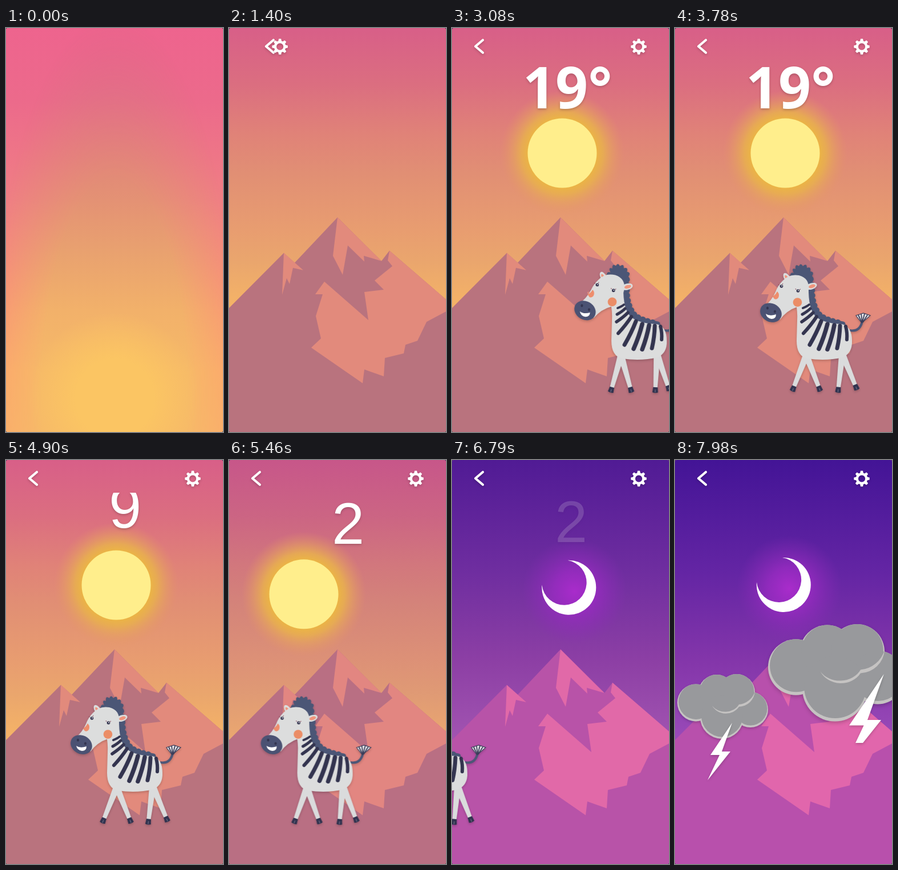
Recreate the animation shown at these times as an HTML page. Size 380 by 704 pixels, loop 8000 ms.

```html
<!DOCTYPE html>
<html lang="en">
<head>
<meta charset="utf-8">
<title>Weather</title>
<style>
  html, body { margin: 0; width: 100%; height: 100%; overflow: hidden; background: #35325f; }
  #stage { position: relative; width: 380px; height: 704px; border-radius: 3px; overflow: hidden; }
  #stage > * { position: absolute; inset: 0; width: 380px; height: 704px; }
  #splash { background: linear-gradient(#ee648e 0, #ec6a8b 18%, #f07f84 43%, #f99179 64%, #fda56e 85%, #fcab6d); }
  #splash i { position: absolute; inset: 0; }
  #core {
    background: linear-gradient(#d86a84 5%, #da7482 16%, #df827a 28%, #e49274 43%, #e9a26f 56%, #f2b16a 70%, #f6b968 85%);
    -webkit-mask-image: radial-gradient(ellipse 230px 690px at 190px 640px, #000 55%, transparent 96%);
    mask-image: radial-gradient(ellipse 230px 690px at 190px 640px, #000 55%, transparent 96%);
  }
  #warm { background: radial-gradient(ellipse 150px 150px at 190px 645px, #fbc563 45%, rgba(251,197,99,0)); }
  .lift { filter: drop-shadow(0 2px 2px rgba(0,0,0,.2)); }
  .bold { font: 700 100px "Open Sans", "Noto Sans", sans-serif; }
  .thin { font: 400 102px "Liberation Sans", Arial, sans-serif; text-anchor: middle; }
</style>
</head>
<body>
<div id="stage">
<svg viewBox="0 0 380 704">
  <defs>
    <linearGradient id="day" x2="0" y2="1">
      <stop offset="0" stop-color="#d85f88"/><stop offset=".14" stop-color="#db6e80"/>
      <stop offset=".26" stop-color="#e08278"/><stop offset=".36" stop-color="#e18f74"/>
      <stop offset=".5" stop-color="#e89d70"/><stop offset=".58" stop-color="#eaa66d"/>
      <stop offset=".7" stop-color="#f6b566"/>
    </linearGradient>
    <linearGradient id="night" x2="0" y2="1">
      <stop offset="0" stop-color="#431496"/><stop offset=".28" stop-color="#6425a4"/>
      <stop offset=".5" stop-color="#8436aa"/><stop offset=".7" stop-color="#9a4bb9"/>
    </linearGradient>
    <radialGradient id="sunGlow">
      <stop offset=".55" stop-color="#ebb445"/><stop offset=".66" stop-color="#e8ae50" stop-opacity=".9"/>
      <stop offset=".8" stop-color="#e6a35d" stop-opacity=".55"/><stop offset="1" stop-color="#e49468" stop-opacity="0"/>
    </radialGradient>
    <radialGradient id="moonGlow">
      <stop offset="0" stop-color="#a92ccb"/><stop offset=".4" stop-color="#9a2bc2" stop-opacity=".8"/>
      <stop offset="1" stop-color="#8a2bb5" stop-opacity="0"/>
    </radialGradient>
    <clipPath id="slot"><path d="M120 57h170v95H120z"/></clipPath>
    <g id="cloud"></g>
    <path id="bolt" d="M43 0L5 56H21L0 100 40 50H25z" fill="#fff"/>
    <g id="leg">
      <path d="M-6-4H6L3.5 60H-3.5z" fill="#dadbdc"/>
      <path d="M-4 58H4L5 67Q0 69-5 67z" fill="#32334f"/>
      <path d="M0 62v5" stroke="#777b92"/>
    </g>
  </defs>

  <rect width="380" height="704" fill="url(#day)"/>
  <rect id="dark" width="380" height="704" fill="url(#night)"/>

  <g id="sun">
    <circle r="109" fill="url(#sunGlow)"/>
    <circle r="60.5" fill="#ffee8c"/>
  </g>
  <g id="moon">
    <circle cx="200" cy="224" r="92" fill="url(#moonGlow)"/>
    <path d="M143 213A47.5 47.5 0 1 0 188 170A39.2 39.2 0 1 1 143 213z" fill="#fff"/>
  </g>
</svg>
<div id="splash"><i id="core"></i><i id="warm"></i></div>
<svg viewBox="0 0 380 704">
  <g id="hills">
    <path id="rock" d="M0 488L96 392 115 409 190 330 267 406 281 388 380 473V704H0z"/>
    <path id="snow" d="M96 392L130 422 112 418 106 446 101 436 93 465z
      M190 330L267 406 236 397 237 407 208 379 199 430 182 397z
      M281 388L380 473V494L346 512 330 545 309 552 306 567 273 575 271 607 237 595 234 619 144 557 161 541 152 502 164 464H151L167 442 244 509 237 460 271 456 255 440 286 415 278 405z"/>
  </g>

  <g fill="#fff" class="lift">
    <g id="temp" class="bold"><text x="124" y="140">1</text><text x="181" y="140">9</text><text x="238" y="140">°</text></g>
    <g id="roll" class="thin" clip-path="url(#slot)"><text id="nine" x="208.5">9</text><text id="two" x="208.5">2</text></g>
  </g>

  <g id="zebra" class="lift">
    <path d="M306 527Q324 530 328 511" fill="none" stroke="#4d5677" stroke-width="4"/>
    <path d="M327 514L317 501 330 497 342 501z" fill="#e9e9ea" stroke="#3a3d5a" stroke-width="1.2"/>
    <path d="M327 513L321 500M328 513L326 498M328 513L332 498M329 513L337 500" stroke="#3a3d5a" stroke-width="1.8"/>
    <g id="legs"></g>
    <g fill="none" stroke="#4b5676" stroke-linecap="round">
      <path id="mane" d="M237 448Q233 484 252 503Q268 512 294 516" stroke-width="9"/>
      <path d="M240 448Q238 484 255 502Q270 511 294 515" stroke-width="11" stroke-dasharray="0 9"/>
    </g>
    <path d="M200 450Q216 478 214 510L213 545Q213 572 232 576Q264 581 294 574Q311 566 310 545Q310 520 292 516Q262 515 248 504Q233 492 234 450z" fill="#dcdddd"/>
    <g id="stripes" fill="none" stroke="#33344f" stroke-linecap="round"></g>
    <g id="head">
      <path d="M201 434Q202 424 208 427Q203 417 211 420Q210 410 217 415Q220 408 224 415Q231 409 231 418Q239 415 237 424Q245 425 240 432Q246 438 240 443Q244 452 236 456z" fill="#4b5676"/>
      <ellipse cx="196" cy="435" rx="5" ry="9" transform="rotate(-32 196 435)" fill="#dcdddd"/>
      <ellipse cx="196" cy="436" rx="2.4" ry="6" transform="rotate(-32 196 436)" fill="#f0957c"/>
      <path d="M188 441Q199 428 217 431Q236 436 234 456Q232 474 214 486Q196 492 184 508L156 486Q170 474 176 460Q180 449 188 441z" fill="#dcdddd"/>
      <ellipse cx="239" cy="450" rx="10" ry="5.5" transform="rotate(-18 239 450)" fill="#dcdddd"/>
      <ellipse cx="240" cy="450" rx="6" ry="3" transform="rotate(-18 240 450)" fill="#f0957c"/>
      <path d="M179 459Q184 464 181 470Q178 474 174 472L171 468Q176 465 179 459z" fill="#ee8d6c"/>
      <circle cx="214.5" cy="478" r="7.8" fill="#eb8d66"/>
      <g fill="#33344f">
        <circle cx="186.500" cy="450" r="2.8"/><circle cx="215.500" cy="458" r="2.8"/>
      </g>
      <path d="M183 448l-2-1M188 447l1-2M212 456l-1-2M218 456l2-1" stroke="#8b4a5d"/>
      <g fill="#fff"><circle cx="187" cy="449.500" r=".9"/><circle cx="216" cy="457.500" r=".9"/></g>
      <ellipse cx="168" cy="496" rx="19.500" ry="16" transform="rotate(26 168 496)" fill="#4b5273"/>
      <ellipse cx="162" cy="488" rx="2" ry="2.500" fill="#33344f"/><ellipse cx="175" cy="494" rx="2" ry="2.500" fill="#33344f"/>
      <path d="M159 498Q166 503 177 499Q177 507 169 507Q161 506 159 498z" fill="#fff"/>
    </g>
  </g>

  <g id="clouds">
    <use id="cloudR" href="#cloud" class="lift"/>
    <use id="cloudL" href="#cloud" class="lift"/>
  </g>
  <g class="lift"><use id="boltR" href="#bolt"/><use id="boltL" href="#bolt"/></g>

  <path id="back" d="M54 21L41 32L54 43" class="lift" fill="none" stroke="#fff" stroke-width="4.200" stroke-linecap="round" stroke-linejoin="round"/>
  <g id="gear" class="lift"></g>
</svg>
</div>
<script>
const $ = id => document.getElementById(id);
const clamp = x => Math.min(1, Math.max(0, x));
const part = (t, a, b) => clamp((t - a) / (b - a));
const out = u => 1 - (1 - u) ** 3;
const smooth = u => u * u * (3 - 2 * u);
const move = (id, x, y, more = '') => $(id).setAttribute('transform', `translate(${x} ${y})${more}`);
const show = (id, o) => { $(id).style.opacity = o; };

// linear path through [time, value] pairs
function track(t, keys) {
  if (t <= keys[0][0]) return keys[0][1];
  for (let i = 1; i < keys.length; i++) {
    const [a, v] = keys[i - 1], [b, w] = keys[i];
    if (t <= b) return v + (w - v) * (t - a) / (b - a);
  }
  return keys[keys.length - 1][1];
}

function mix(a, b, p) {
  return `rgb(${a.map((v, i) => Math.round(v + (b[i] - v) * p))})`;
}

// static pieces
const puffs = [[32.5, 50, 32.5], [69, 33, 32], [104, 32, 32], [128, 62, 31], [78, 75, 38]];
const disc = (x, y, r, c) => `<circle cx="${x}" cy="${y}" r="${r}" fill="${c}"/>`;
$('cloud').innerHTML =
  puffs.map(([x, y, r]) => disc(x, y, r, '#c5c3c2')).join('') +
  puffs.map(([x, y, r]) => disc(x + .3, y - 1.8, r - 1.8, '#98999c')).join('') +
  '<path d="M61 55A27 25 0 0 0 108 57A29 29 0 0 0 136 30A32 32 0 0 1 108 53A27 23 0 0 1 61 55z" fill="#c5c3c2"/>';

$('gear').innerHTML = '<circle r="8.200" fill="none" stroke="#fff" stroke-width="4.200"/>' +
  [...Array(8).keys()].map(i => `<path d="M-3-9L-2-13.700H2L3-9z" fill="#fff" transform="rotate(${i * 45})"/>`).join('');

const stripes = [
  [235, 482, 224, 488, 4], [237, 489, 223, 499, 5], [242, 496, 222, 512, 5.5],
  [248, 503, 225, 532, 6], [256, 511, 236, 552, 7], [267, 516, 252, 559, 7.5],
  [279, 518, 267, 560, 7.5], [289, 519, 284, 558, 7], [299, 520, 301, 543, 6]
];
$('stripes').innerHTML = stripes.map(([x, y, u, v, w]) =>
  `<path d="M${x} ${y}Q${(x + u) / 2 + 2} ${(y + v) / 2} ${u} ${v}" stroke-width="${w}"/>`).join('');

const legs = [[230, 570, 0, 22], [230, 570, 0, -22], [293, 568, -8, 15], [293, 568, -8, -15]];
$('legs').innerHTML = legs.map(() => '<use href="#leg"/>').join('');
const legNodes = [...$('legs').children];

function zebra(t) {
  const left = track(t, [[1400, 385], [2310, 293], [3290, 194], [3570, 167], [3780, 149],
    [4060, 126], [4270, 113], [4900, 113], [5300, 77], [6020, -19], [7500, -240]]);
  move('zebra', left - 149, 0);
  let swing = 1;
  if (t < 4270) swing = Math.cos(Math.PI * (4270 - t) / 530);
  else if (t > 4900) swing = Math.cos(Math.PI * (t - 4900) / 490);
  legs.forEach(([x, y, base, amp], i) =>
    legNodes[i].setAttribute('transform', `translate(${x} ${y}) rotate(${base + amp * swing})`));
  const nod = t < 3780 ? 3 + 3 * Math.cos(2 * Math.PI * (t - 2310) / 980) : 0;
  $('head').setAttribute('transform', `rotate(${nod} 226 476)`);
}

function temperature(t) {
  const rolling = t >= 4865;
  show('temp', rolling ? 0 : part(t, 1750, 2170));
  move('temp', 0, track(t, [[1750, 40], [2100, 10], [2310, 2], [2900, 0]]));
  show('roll', rolling ? 1 - part(t, 6440, 6860) : 0);
  const y = 143 - track(t, [[4865, 20], [4900, 25], [5250, 95], [5500, 116]]);
  $('nine').setAttribute('y', y);
  $('two').setAttribute('y', y + 116);
}

function sky(t) {
  const p = smooth(part(t, 5000, 7200));
  show('dark', p);
  $('rock').setAttribute('fill', mix([185, 115, 126], [184, 80, 172], p));
  $('snow').setAttribute('fill', mix([226, 138, 124], [225, 102, 172], p));

  const gone = Math.max(0, (t - 4900) / 1120) ** 2;
  const late = 1 - out(part(t, 1500, 2700));
  move('sun', 193 + 300 * late - 247 * gone, 218 + 20 * late + 63 * gone);
  const far = 340 * (1 - out(part(t, 5750, 7350)));
  move('moon', far, far / 3);
}

function storm(t) {
  const far = 1 - out(part(t, 6860, 7560));
  show('clouds', t < 6860 ? 0 : 1);
  move('cloudL', 4 - 175 * far, 373);
  move('cloudR', 163 + 230 * far, 286, ' scale(1.5)');
  move('boltL', 57, 458);
  move('boltR', 297, 373, ' scale(1.6)');
  const wipe = (id, p) => {
    $(id).style.clipPath = `inset(0 0 ${100 - 100 * p}% 0)`;
    show(id, p > 0 ? 1 : 0);
  };
  wipe('boltR', track(t, [[7500, 0], [7560, .14], [7840, .53], [7980, .745]]));
  wipe('boltL', part(t, 7570, 7970));
}

function draw(now) {
  const t = now % 8000;
  show('splash', 1 - part(t, 240, 700));
  move('hills', 0, 400 * (1 - out(part(t, 240, 980))));
  move('back', track(t, [[800, -65], [1120, -38], [1260, -21], [1400, 24], [1610, 0]]), 0);
  move('gear', track(t, [[800, -25], [1260, 86], [1400, 88.5], [1610, 235], [1820, 312], [1960, 327]]), 32.5);
  sky(t);
  temperature(t);
  zebra(t);
  storm(t);
  requestAnimationFrame(() => draw(performance.now()));
}
draw(0);
</script>
</body>
</html>
```
